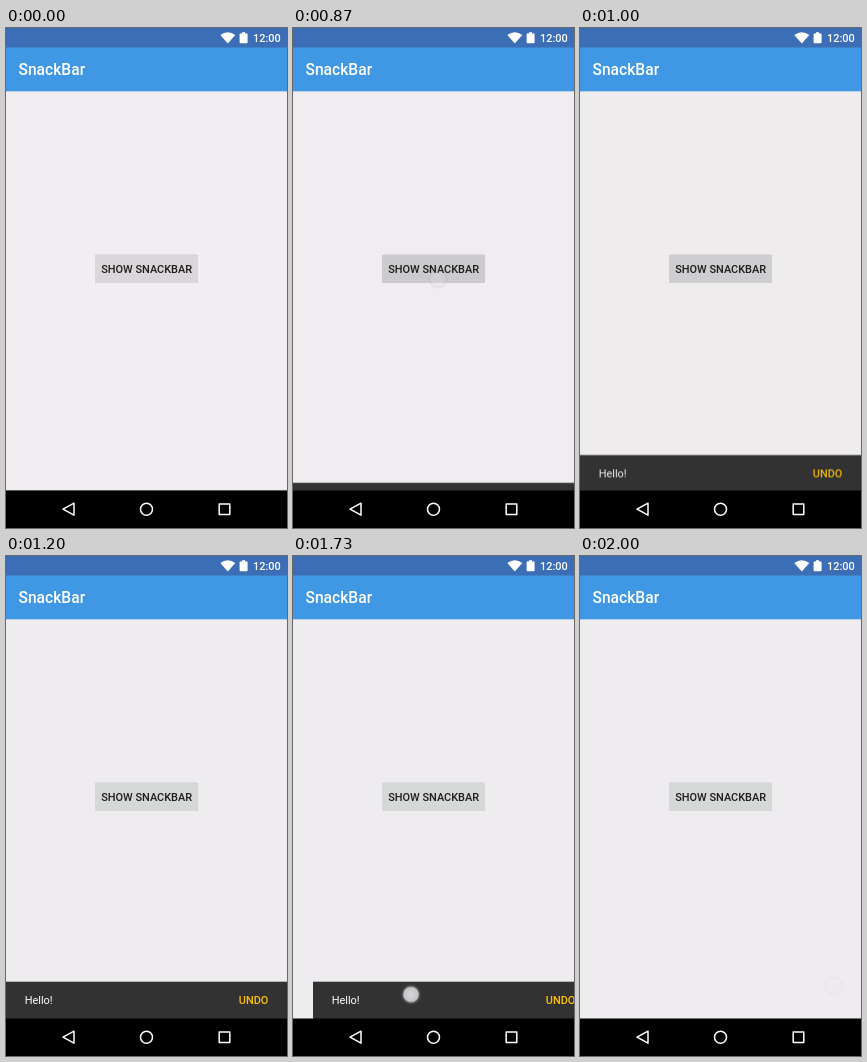
These frames come from a looping animation (281x500 px, 2390 ms). An HTML page:

```html
<!DOCTYPE html>
<html lang="en">
<head>
<meta charset="utf-8">
<title>SnackBar</title>
<style>
  html, body { margin: 0; width: 100%; height: 100%; overflow: hidden; background: #000; }
  svg { display: block; width: 100%; height: 100%; }
  text { font: 500 10.93px Roboto, sans-serif; fill: #fff; }
  .title { font-size: 15.6px; }
  .button text { fill: #1c1c1c; }
  .button rect { filter: drop-shadow(0 .8px .7px rgba(0, 0, 0, .28)); }
  .appbar { filter: drop-shadow(0 .5px .6px rgba(0, 0, 0, .1)); }
  .hello { font-weight: 400; }
  .undo { fill: #ffc107; }
  .nav { fill: none; stroke: #fff; stroke-width: 1.5; stroke-linejoin: round; }
</style>
</head>
<body>
<svg viewBox="0 0 281 500">
  <defs>
    <radialGradient id="halo">
      <stop offset=".7" stop-color="#85858c" stop-opacity=".65"/>
      <stop offset="1" stop-color="#85858c" stop-opacity="0"/>
    </radialGradient>
    <radialGradient id="dot">
      <stop offset="0" stop-color="#fff" stop-opacity=".78"/>
      <stop offset="1" stop-color="#f4f4f8" stop-opacity=".68"/>
    </radialGradient>
  </defs>

  <rect id="page" width="281" height="500"/>
  <rect class="appbar" y="19" width="281" height="44.3" fill="#4097e3"/>
  <rect width="281" height="19.5" fill="#3c6eb6"/>
  <text class="title" x="12.5" y="47.4">SnackBar</text>

  <g fill="#fff">
    <path d="M214.3 7Q221.8 1.6 229.3 7L221.8 15.6Z"/>
    <path d="M236 4.3h3.2v1.2h1.6q.8 0 .8.8v8.2q0 .8-.8.8h-6.4q-.8 0-.8-.8V6.300q0-.8.8-.8h1.600z"/>
  </g>
  <text x="247" y="14.2">12:00</text>

  <g class="button">
    <rect id="face" x="89" y="226.800" width="103" height="28.200" rx="1.6"/>
    <text x="95.200" y="245">SHOW SNACKBAR</text>
  </g>

  <g id="bar">
    <rect y="425.700" width="281" height="37.300" fill="#323232"/>
    <g id="labels">
      <text class="hello" x="18.700" y="448.300">Hello!</text>
      <text class="undo" x="232.800" y="448.300">UNDO</text>
    </g>
  </g>

  <rect y="462.500" width="281" height="37.500"/>
  <g class="nav">
    <path d="M57 481.200L68 475.200V487.200Z"/>
    <circle cx="140.500" cy="481.200" r="6"/>
    <rect x="213.200" y="476" width="10.600" height="10.600"/>
  </g>

  <g id="touch">
    <circle r="10.500" fill="url(#halo)"/>
    <circle r="7.800" fill="url(#dot)"/>
  </g>
</svg>

<script>
const LOOP = 2390;
// The screen refreshes only at these moments.
const ticks = [0, 730, 800, 870, 930, 1000, 1070, 1130, 1200,
               1670, 1730, 1800, 1870, 1930, 2000];
const standard = 'cubic-bezier(.4, 0, .2, 1)';
const anims = [];

// Each step: [time, value, easing towards the next step]
function track(id, prop, steps) {
  const all = [...steps, [LOOP, steps[steps.length - 1][1]]];
  const frames = all.map(([t, value, easing = 'linear']) =>
    ({ offset: t / LOOP, [prop]: value, easing }));
  const anim = document.getElementById(id)
    .animate(frames, { duration: LOOP, fill: 'both' });
  anim.pause();
  anims.push(anim);
}

const at = (x, y) => `translate(${x}px, ${y}px)`;

track('page', 'fill', [[0, '#f1edf0'], [800, '#f1edf0'], [930, '#efecee'], [1200, '#eeecef']]);
track('face', 'fill', [[0, '#dad6d9'], [730, '#dad6d9'], [870, '#cbcbcd'],
                       [930, '#cbcbcd'], [1200, '#d6d7d7']]);

track('bar', 'transform', [[0, at(0, 37)], [810, at(0, 37), standard], [1060, at(0, 0)],
                           [1670, at(0, 0)], [1730, at(20, 0)], [1800, at(81.5, 0)],
                           [1870, at(165, 0)], [1930, at(281, 0)]]);
track('bar', 'opacity', [[0, 1], [1730, 1], [1800, .67], [1870, .08], [1930, 0]]);
track('labels', 'opacity', [[0, 0], [880, 0, standard], [1060, 1]]);

track('touch', 'transform', [[0, at(145, 251)], [1200, at(145, 251), 'steps(1)'],
                             [1670, at(58, 442)], [1730, at(118, 438.5)], [1800, at(202.500, 433.500)],
                             [1870, at(240, 431)], [1930, at(251, 430)], [2000, at(254, 430)]]);
track('touch', 'opacity', [[0, 0, 'steps(1)'], [730, .8], [800, .8], [870, .25], [930, 0, 'steps(1)'],
                           [1670, 1], [1870, .9], [1930, .5], [2000, .12]]);

const start = performance.now();
function draw() {
  const t = (performance.now() - start) % LOOP;
  const tick = ticks.filter(k => k <= t).pop();
  for (const anim of anims) anim.currentTime = tick;
  requestAnimationFrame(draw);
}
draw();
</script>
</body>
</html>
```
